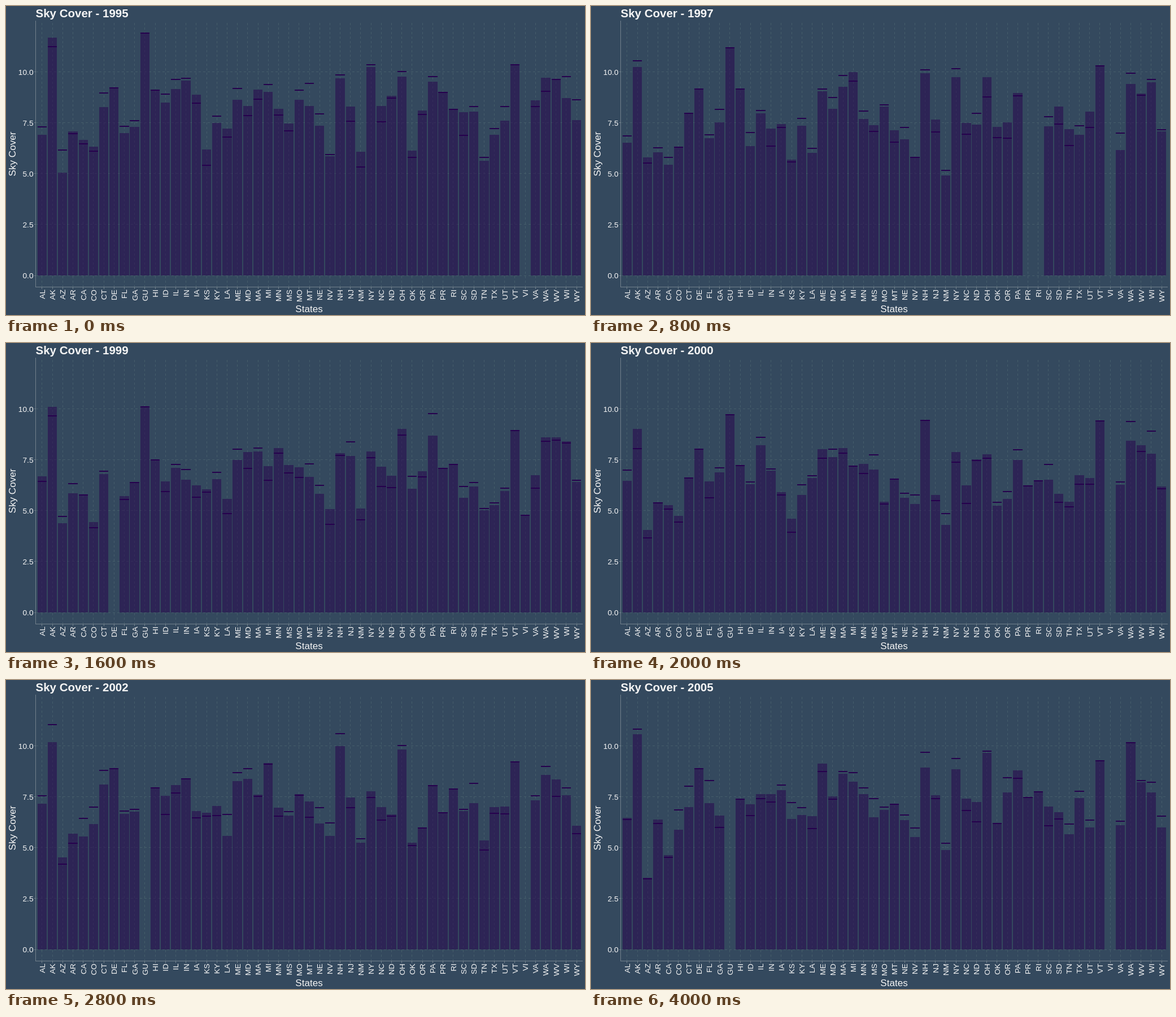
Animation, 1025 px wide and 547 px high, one loop 4.4 s. Source, as an HTML page:

```html
<!DOCTYPE html>
<html lang="en">
<head>
<meta charset="utf-8">
<title>Sky Cover</title>
<style>
  html, body { margin: 0; width: 100%; height: 100%; overflow: hidden; background: #34495e; }
  svg { display: block; width: 1025px; height: 547px; font-family: Arial, "Liberation Sans", sans-serif; fill: #f5f5f5; }
  rect, line { shape-rendering: crispEdges; }
  .title { font-size: 20.5px; font-weight: bold; }
  .name { font-size: 17.1px; text-anchor: middle; }
  .tick { font-size: 13.7px; text-anchor: end; }
  .grid { stroke: #455d6a; stroke-dasharray: 4 4; }
  .axis { stroke: #72818d; }
  .bar { fill: #26004d; fill-opacity: .5; }
  .mark { fill: #26004d; }
</style>
</head>
<body>
<svg id="stage" viewBox="0 0 1025 547"></svg>
<script>
const STATES = ('AL AK AZ AR CA CO CT DE FL GA GU HI ID IL IN IA KS KY LA ME MD MA MI MN MS MO MT ' +
  'NE NV NH NJ NM NY NC ND OH OK OR PA PR RI SC SD TN TX UT VT VI VA WA WV WI WY').split(' ');
// Typical cover; states not named here lie at the usual level.
const USUAL = 7.1;
const LEVELS = {
  4.8: 'AZ', 5.5: 'NM NV', 6: 'AR CA CO KS OK TN VI', 6.6: 'LA NE SC TX',
  7.6: 'CT IA MN ND PR RI', 7.9: 'HI IL IN', 8.4: 'MA MD ME WI', 8.7: 'DE MI PA',
  9.1: 'NY OH WA WV', 9.6: 'NH VT', 10.5: 'AK GU'
};
const SINGLE = 'DE GU HI PR RI VI VT'; // one reading: the mark sits on the bar
const FIRST = 1995, HOLD = 400;
const SHIFTS = [.8, .5, .3, .4, -.6, -.6, -.6, -.2, .1, 0, -.1];
const MISSING = ['VI', 'VI', 'PR RI VI', 'DE GU VI', 'DE', 'VI', 'GU RI', 'GU VI',
  'DE GU HI PR RI VT VI', 'VI', 'GU VI'];

const LEFT = 53, RIGHT = 1021, TOP = 26, BOTTOM = 498, BASE = 477, UNIT = 36.05;
const STEP = (RIGHT - LEFT) / (STATES.length + .2), BAR = STEP * .9;
const stage = document.getElementById('stage');

function add(tag, attrs, text) {
  const el = document.createElementNS(stage.namespaceURI, tag);
  for (const key in attrs) el.setAttribute(key, attrs[key]);
  if (text) el.textContent = text;
  return stage.appendChild(el);
}
const line = (cls, x1, y1, x2, y2) => add('line', { class: cls, x1, y1, x2, y2 });
const centre = i => LEFT + (i + .6) * STEP;

let seed = 1995;
function random() {
  seed = (seed * 1664525 + 1013904223) % 4294967296;
  return seed / 4294967296;
}
const spread = size => (random() + random() - 1) * size;

function level(state) {
  const key = Object.keys(LEVELS).find(k => LEVELS[k].includes(state));
  return key ? +key : USUAL;
}
const years = SHIFTS.map((shift, n) => STATES.map(state => {
  const cover = level(state) + shift + spread(1.3);
  const gap = spread(1.2);
  if (MISSING[n].includes(state)) return null;
  return { cover, median: SINGLE.includes(state) ? cover : cover + gap };
}));

for (let v = 0; v <= 10; v += 2.5) {
  const y = BASE - v * UNIT, py = Math.floor(y) + .5;
  line('grid', LEFT, py, RIGHT, py);
  line('axis', LEFT - 3, py, LEFT, py);
  add('text', { class: 'tick', x: 48.5, y: y + 5 }, v.toFixed(1));
}
STATES.forEach((s, i) => {
  const x = centre(i), px = Math.floor(x) + .5;
  line('grid', px, BOTTOM, px, TOP);
  line('axis', px, BOTTOM, px, BOTTOM + 3);
  add('text', { class: 'tick', transform: `translate(${x + 4.9} 502) rotate(-90)` }, s);
});

const box = (cls, i) => add('rect', { class: cls, x: centre(i) - BAR / 2, width: BAR });
const bars = STATES.map((s, i) => box('bar', i));
const marks = STATES.map((s, i) => box('mark', i));
line('axis', LEFT - .5, TOP, LEFT - .5, BOTTOM);
line('axis', LEFT - .5, BOTTOM - .5, RIGHT, BOTTOM - .5);
const title = add('text', { class: 'title', x: 52.5, y: 20 });
add('text', { class: 'name', x: 536.5, y: 542 }, 'States');
add('text', { class: 'name', transform: 'translate(17 262) rotate(-90)' }, 'Sky Cover');

function place(el, y, height) {
  el.setAttribute('y', y);
  el.setAttribute('height', height);
}
function show(n) {
  title.textContent = 'Sky Cover - ' + (FIRST + n);
  years[n].forEach((d, i) => {
    const height = d ? Math.round(d.cover * UNIT) : 0;
    place(bars[i], BASE - height, height);
    place(marks[i], d ? Math.round(BASE - d.median * UNIT) - 1 : 0, d ? 2 : 0);
  });
}

let shown;
function tick() {
  const n = Math.floor(performance.now() / HOLD) % years.length;
  if (n !== shown) show(shown = n);
  requestAnimationFrame(tick);
}
tick();
</script>
</body>
</html>
```
